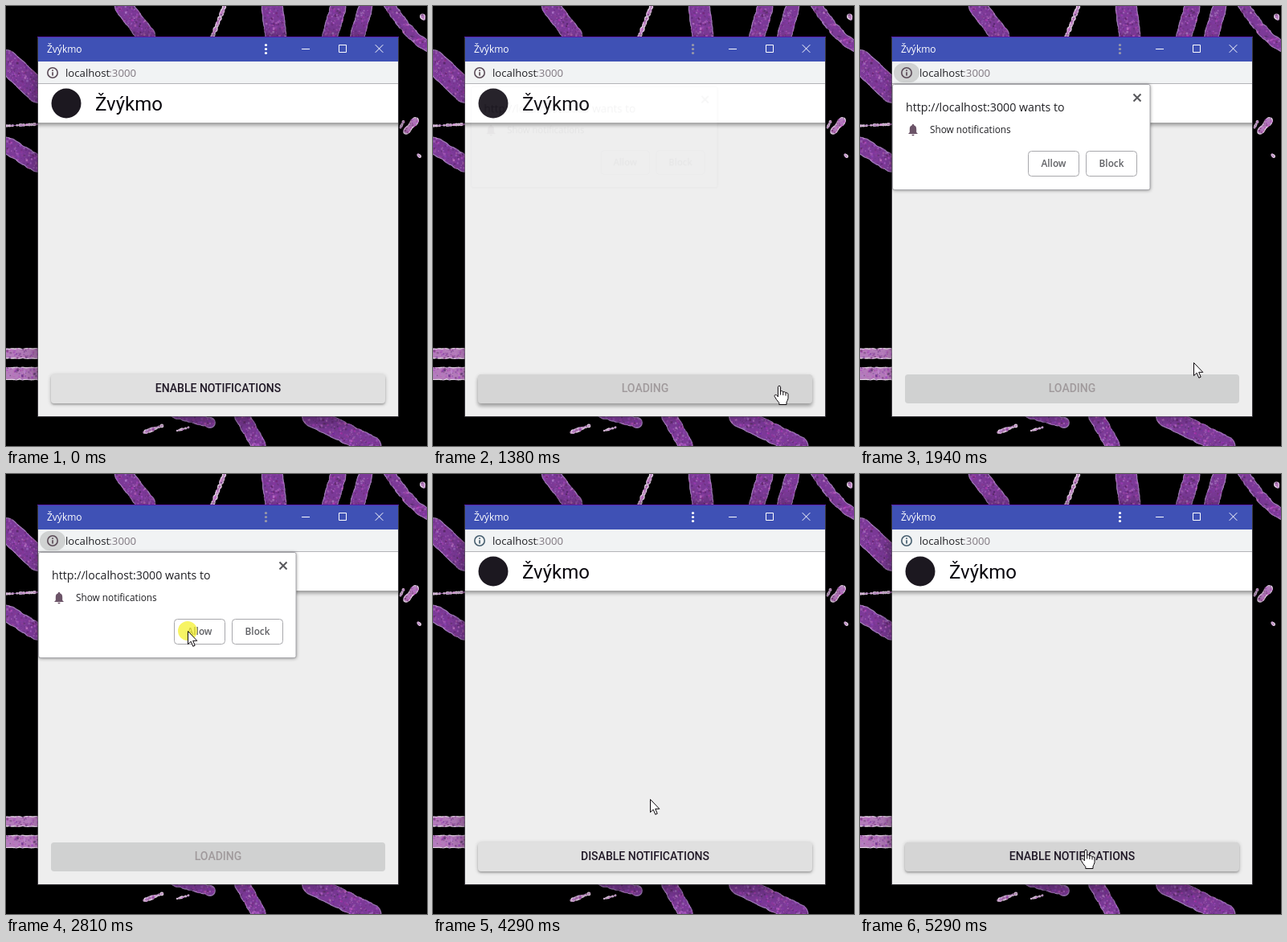
These frames come from a looping animation (524 px wide and 547 px high, 6.86 s). An HTML page with a canvas:

```html
<!DOCTYPE html>
<html lang="en">
<head>
<meta charset="utf-8">
<title>Notification prompt</title>
<style>
html, body { margin: 0; width: 100%; height: 100%; overflow: hidden; background: #000; }
canvas { display: block; }
</style>
</head>
<body>
<canvas id="stage" width="524" height="547"></canvas>
<script>
const W = 524, H = 547, LOOP = 6860, TICK = 80, APP = 'Žvýkmo';
const ctx = document.getElementById('stage').getContext('2d');
const UI = '"Open Sans", "Noto Sans", sans-serif', APP_FONT = 'Roboto, sans-serif';

// ---------- helpers ----------
function seeded(seed) {
  return () => {
    seed = (seed + 0x6D2B79F5) | 0;
    let n = Math.imul(seed ^ (seed >>> 15), 1 | seed);
    n = (n + Math.imul(n ^ (n >>> 7), 61 | n)) ^ n;
    return ((n ^ (n >>> 14)) >>> 0) / 4294967296;
  };
}

const lerp = (a, b, p) => a + (b - a) * p;
const ease = p => p * p * (3 - 2 * p);
const within = (t, a, b) => t >= a && t < b;
const mix = (a, b, p) => `rgb(${a.map((v, i) => Math.round(lerp(v, b[i], p)))})`;

// progress from 0 to 1 between two times, in jumps of about one tick
function ramp(t, a, b) {
  const n = Math.round((b - a) / TICK);
  return Math.min(1, Math.max(0, Math.floor((t - a) / (b - a) * n + 1e-6) / n));
}

function layer(draw) {
  const cv = document.createElement('canvas');
  cv.width = W;
  cv.height = H;
  draw(cv.getContext('2d'));
  return cv;
}

function text(c, s, x, y, font, color, align = 'left') {
  c.font = font;
  c.fillStyle = color;
  c.textAlign = align;
  c.fillText(s, x, y);
}

function box(c, x, y, w, h, r, fill, stroke) {
  c.beginPath();
  c.roundRect(x, y, w, h, r);
  if (fill) { c.fillStyle = fill; c.fill(); }
  if (stroke) { c.strokeStyle = stroke; c.lineWidth = 1; c.stroke(); }
}

function disc(c, x, y, r, fill) {
  c.beginPath();
  c.arc(x, y, r, 0, 7);
  c.fillStyle = fill;
  c.fill();
}

function cross(c, x, y, r, color, width) {
  c.strokeStyle = color;
  c.lineWidth = width;
  c.beginPath();
  for (const s of [-1, 1]) { c.moveTo(x - r, y - r * s); c.lineTo(x + r, y + r * s); }
  c.stroke();
}

function shadowed(c, alpha, blur, dy, draw) {
  c.save();
  c.shadowColor = `rgba(0,0,0,${alpha})`;
  c.shadowBlur = blur;
  c.shadowOffsetY = dy;
  draw();
  c.restore();
}

function raised(level, draw) {
  shadowed(ctx, 0.24, 5, level, draw);
  shadowed(ctx, 0.18, 2 * level, 2 * level, draw);
}

// ---------- wallpaper ----------
// strokes across a margin: place on the outer edge, place on the window edge, width
const TOP = [[146, 175, 23], [272, 257, 5], [331, 336, 27], [414, 403, 20], [448, 437, 18]];
const LEFT = [[68, 106, 29], [149, 147, 3], [172, 197, 21], [432, 432, 13], [457, 457, 16]];
const BOTTOM = [[315, 294, 19], [455, 380, 25]];
// loose pieces: centre, half extent, width
const PIECES = [[183, 526, 11, -4, 5], [220, 526, 7, -2, 3], [504, 149, 6, -7, 9],
  [493, 147, 2, -4, 3], [519, 14, 1, 2, 6], [514, 186, 1, 1, 4], [232, 512, 22, 6, 13]];

function paintWallpaper(c) {
  const rnd = seeded(11);
  const brush = (at, length, w, pale) => {
    const n = Math.ceil(length / 1.5) + 2, dots = [];
    for (let i = 0; i <= n; i++) dots.push([...at(i / n), w / 2 - 1.2 + rnd() * 1.8]);
    for (const [x, y, r] of dots) disc(c, x, y, r, pale ? '#e2d2e2' : '#9a78b0');
    for (const [x, y, r] of dots) disc(c, x, y, Math.max(r - 1.3, 0.5), pale ? '#b47cba' : '#7c3a98');
  };
  const line = (x0, y0, x1, y1, w, pale) =>
    brush(p => [lerp(x0, x1, p), lerp(y0, y1, p)], Math.hypot(x1 - x0, y1 - y0), w, pale);

  for (const [a, b, w] of TOP) line(a, 0, b, 38, w, w < 10);
  for (const [a, b, w] of LEFT) line(0, a, 40, b, w, w < 20);
  for (const [a, b, w] of BOTTOM) line(a, H, b, 510, w);
  for (const [x, y, dx, dy, w] of PIECES) line(x - dx, y - dy, x + dx, y + dy, w, w < 10);
  brush(p => [lerp(475, 530, p), -4 + 56 * Math.sin(p * 1.4)], 75, 14);

  // mottled paint
  c.globalCompositeOperation = 'source-atop';
  for (let i = 0; i < 45000; i++) {
    const s = 0.8 + rnd() * 2;
    c.fillStyle = `hsla(${272 + rnd() * 36},${35 + rnd() * 30}%,${18 + rnd() * 55}%,${0.2 + rnd() * 0.4})`;
    c.fillRect(rnd() * W, rnd() * H, s, s);
  }
  c.globalCompositeOperation = 'destination-over';
  c.fillStyle = '#000';
  c.fillRect(0, 0, W, H);
}
const wallpaper = layer(paintWallpaper);

// ---------- window ----------
function infoIcon(color) {
  ctx.strokeStyle = color;
  ctx.lineWidth = 1.6;
  ctx.beginPath();
  ctx.arc(58, 83, 6.2, 0, 7);
  ctx.stroke();
  ctx.fillStyle = color;
  ctx.fillRect(57.2, 79.3, 1.7, 1.7);
  ctx.fillRect(57.2, 82.2, 1.7, 4.4);
}

function drawWindow({ focus, pill, icon }) {
  shadowed(ctx, focus ? 0.5 : 0.3, focus ? 20 : 12, 3, () => box(ctx, 40, 38, 448, 472, 0, '#eee'));
  box(ctx, 39.5, 38.5, 449, 472, 0, null, 'rgba(96,92,100,.6)');
  box(ctx, 40, 38, 448, 31, 0, '#3f51b5');
  box(ctx, 39, 38, 450, 1, 0, '#5a1cae');
  text(ctx, APP, 51, 58, '12px ' + UI, '#fff');
  for (const dy of [-5, 0, 5]) disc(ctx, 323.5, 53.5 + dy, 1.6, focus ? '#fff' : '#9a9aa8');
  box(ctx, 368, 53, 10, 1, 0, '#fff');
  box(ctx, 414.5, 48.5, 9, 9, 0, null, '#fff');
  cross(ctx, 464.5, 53, 4.8, '#fff', 1);

  ctx.save();
  ctx.beginPath();
  ctx.rect(40, 69, 448, 441);
  ctx.clip();
  raised(2, () => box(ctx, 36, 97, 456, 48, 0, '#fff'));
  box(ctx, 40, 69, 448, 27, 0, '#f1f3f4');
  box(ctx, 40, 96, 448, 1, 0, '#b4b4b8');
  ctx.restore();

  if (pill) box(ctx, 42, 71, 32, 24, 12, '#d0d2d2');
  infoIcon(icon);
  text(ctx, 'localhost', 74, 88, '13.2px ' + UI, '#202024');
  text(ctx, ':3000', 162, 88, '13.2px ' + UI, '#807880', 'right');
  disc(ctx, 75, 121, 18.5, '#1c1820');
  text(ctx, APP, 111, 130, '24px ' + APP_FONT, '#08060c');
}

function drawButton({ label, bg, ink, lift }) {
  const face = () => box(ctx, 56, 458, 416, 36, 4, bg);
  if (lift > 0) raised(lift, face);
  else face();
  text(ctx, label, 264, 480, '500 14px ' + APP_FONT, ink, 'center');
}

// ---------- permission prompt ----------
const bell = new Path2D('M-6 5-4.2 3V-1C-4.2-4-3-5.4-1-5.8V-7H1V-5.8C3-5.4 4.2-4 4.2-1V3L6 5Z' +
  'M-1.6 5.8A1.6 1.6 0 0 0 1.6 5.8Z');

function paintPrompt(c) {
  shadowed(c, 0.5, 4, 1, () => box(c, 41, 97, 320, 131, 2, '#fff'));
  box(c, 40.5, 97.5, 320.5, 131, 2, null, '#a8a8ac');
  cross(c, 345, 114, 4.5, '#58585c', 2);
  text(c, 'http://localhost:3000 wants to', 57, 131, '14.2px ' + UI, '#202024');
  text(c, 'Show notifications', 87, 158, '11.8px ' + UI, '#202024');
  ['Allow', 'Block'].forEach((label, i) => {
    const x = 209 + 72 * i;
    box(c, x + 0.5, 180.5, 63, 31, 4, '#fff', '#a8a8ac');
    text(c, label, x + 32, 200, '600 11.8px ' + UI, '#5f6064', 'center');
  });
  c.translate(66, 154);
  c.fillStyle = '#6c5468';
  c.fill(bell);
}
const prompt = layer(paintPrompt);

function drawPrompt(shown) {
  const scale = lerp(0.955, 1, shown);
  ctx.save();
  ctx.globalAlpha = lerp(0.05, 1, shown);
  ctx.translate(201, 163);
  ctx.scale(scale, scale);
  ctx.drawImage(prompt, -201, -163);
  ctx.restore();
}

// ---------- cursor ----------
const arrow = new Path2D('M.5 .5V16.6L4.2 13.2 6.8 19.3 9.2 18.2 6.7 12.3H11.8Z');
const hand = new Path2D('M-1.6 1.6C-1.6-.2 1.6-.2 1.6 1.6V7C2.5 6.2 4.6 6.4 4.8 8 ' +
  '5.8 7.2 7.8 7.6 8 9 9.2 8.4 11 9 11 10.8V15.5C11 17.5 9.2 19.5 9 21V23.5H-.2V21.4' +
  'C-2.2 19-4.4 16.4-5.8 13.4-6.6 11.4-4 10.6-2.8 12.2L-1.6 13.8Z');
const knuckles = new Path2D('M1.6 7V11.5M4.8 8V12M8 9V12.5');

function drawCursor({ x, y, over, spot }) {
  if (spot) disc(ctx, x, y, 12, `rgba(244,240,40,${spot})`);
  ctx.save();
  ctx.translate(x, y);
  ctx.fillStyle = '#fff';
  ctx.fill(over ? hand : arrow);
  ctx.strokeStyle = '#0c080c';
  ctx.lineWidth = 1;
  ctx.stroke(over ? hand : arrow);
  if (over) ctx.stroke(knuckles);
  ctx.restore();
}

// ---------- timeline ----------
const MOVES = [
  { start: 510, end: 1000, from: [505, 457], to: [431, 472] },
  { start: 1940, end: 2420, from: [415, 443], to: [226, 195] },
  { start: 3510, end: 3590, from: [227, 200], to: [227, 201] },
  { start: 3810, end: 4450, from: [227, 203], to: [278, 441] },
  { start: 4510, end: 4750, from: [278, 447], to: [281, 467] }
];
const CLICKS = [1300, 2810, 4990];

function cursorAt(t) {
  const move = MOVES.findLast(m => t >= m.start);
  if (!move) return null;
  const p = ease(ramp(t, move.start, move.end));
  const [x, y] = move.from.map((v, i) => Math.round(lerp(v, move.to[i], p)));
  const clicked = CLICKS.some(c => within(t, c, c + TICK));
  return { x, y, over: y >= 458 && x < 472, spot: clicked ? 0.72 : 0 };
}

const REST = [224, 224, 224], HOVER = [213, 213, 213], OFF = [208, 209, 209];
const INK = [32, 24, 38], FAINT = [160, 154, 156];

function buttonAt(t, over) {
  const busy = within(t, 1380, 3110) || within(t, 5130, 5210);
  const pressed = within(t, 1300, 1460) || within(t, 5070, 5130);
  const off = ramp(t, 1380, 1540) - ramp(t, 3110, 3280) + ramp(t, 5070, 5130) - ramp(t, 5210, 5290);
  const action = within(t, 3110, 5210) ? 'DISABLE' : 'ENABLE';
  return {
    label: busy ? 'LOADING' : action + ' NOTIFICATIONS',
    bg: mix(over ? HOVER : REST, OFF, off),
    ink: mix(INK, FAINT, busy ? 1 : off),
    lift: (pressed ? 2 : 1) * (1 - off)
  };
}

function render(t) {
  const cursor = cursorAt(t);
  ctx.drawImage(wallpaper, 0, 0);
  drawWindow({
    focus: !within(t, 1380, 2870),
    pill: within(t, 1460, 2950),
    icon: t < 3110 ? '#5c4c58' : '#486070'
  });
  drawButton(buttonAt(t, cursor && cursor.over));
  if (within(t, 1380, 2950)) drawPrompt(ease(ramp(t, 1380, 1620)) - ramp(t, 2810, 2950));
  if (cursor) drawCursor(cursor);
}

const began = performance.now();
function tick() {
  render((performance.now() - began) % LOOP);
  requestAnimationFrame(tick);
}
tick();
</script>
</body>
</html>
```
